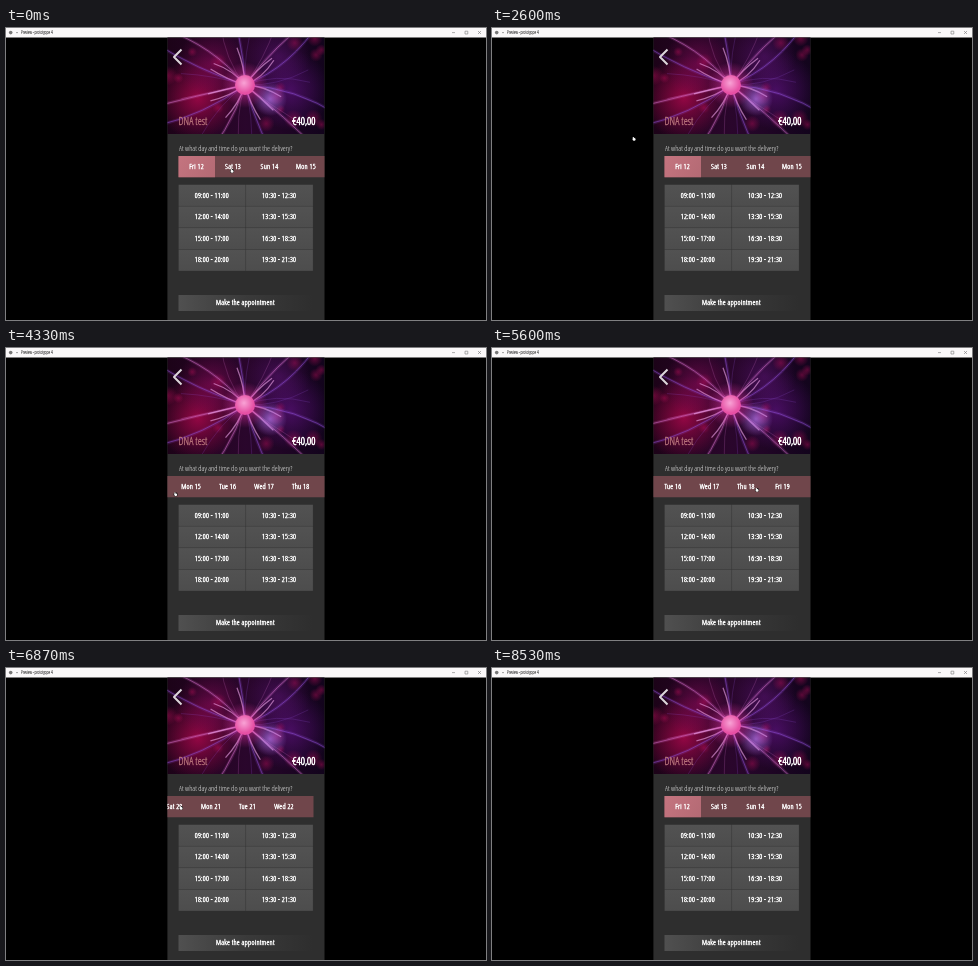
An HTML page with a canvas that plays this animation: 480 px wide and 292 px high, repeating every 9870 ms.

```html
<!DOCTYPE html>
<html lang="en">
<head>
<meta charset="utf-8">
<title>Appointment picker</title>
<style>
html, body { margin: 0; width: 100%; height: 100%; overflow: hidden; background: #000; }
canvas { display: block; width: 480px; height: 292px; }
</style>
</head>
<body>
<canvas id="stage"></canvas>
<script>
const W = 480, H = 292, LOOP = 9870, STEP = 1000 / 15;
const canvas = document.getElementById('stage');
const ctx = canvas.getContext('2d');
const dpr = window.devicePixelRatio || 1;
canvas.width = W * dpr;
canvas.height = H * dpr;

const FONT = '"Open Sans", "Noto Sans", sans-serif';
const DAYS = 'Fri 12,Sat 13,Sun 14,Mon 15,Tue 16,Wed 17,Thu 18,Fri 19,Sat 20,Mon 21,Tue 21,Wed 22'.split(',');
const PHONE = { x: 161.4, y: 9.5, w: 157.1 };
const LEFT = 172.5, CELL_W = 67.3, ROW_H = 21.6;
const CORE = { x: 239, y: 57 };

// Eased progress from 0 to 1 between two times
function glide(t, from, to) {
  const u = Math.min(1, Math.max(0, (t - from) / (to - from)));
  return u * u * (3 - 2 * u);
}

// Eased swing from 0 to 1 and back
const swing = (t, from, to) => Math.sin(Math.PI * glide(t, from, to));

function pose(t) {
  const hover = glide(t, 70, 730);
  const aside = glide(t, 1205, 1265);
  const rest = glide(t, 2470, 2730);
  const back = glide(t, 3070, 3665);
  const drag1 = glide(t, 3900, 4565);
  const again = glide(t, 4670, 5595);
  const drag2 = glide(t, 5670, 6260);
  const follow = glide(t, 6300, 6670);
  const rewind = glide(t, 7200, 7900);
  const lift = glide(t, 7850, 8130);
  const leave = glide(t, 8200, 8530);
  return {
    scroll: 155.5 * glide(t, 3893, 4555) + 158.5 * drag2 - 314 * glide(t, 7150, 8000),
    x: 226 + 60 * hover + 30 * swing(t, 70, 730) - 136 * aside - 16 * rest + 161 * back
      - 174 * drag1 + 144 * again + 25 * swing(t, 4670, 5595) - 155 * drag2
      + 65 * follow + 230 * rewind + 44 * leave,
    y: 143 - 32 * aside + 34 * back + 22 * swing(t, 3070, 3665) + 2 * drag1 - 5 * again
      - 2 * follow - 56 * lift + 146 * leave,
    shown: t < 8500
  };
}

function seeded(seed) {
  return () => {
    seed = (seed * 16807) % 2147483647;
    return seed / 2147483647;
  };
}

function rect(x, y, w, h, fill) {
  ctx.fillStyle = fill;
  ctx.fillRect(x, y, w, h);
}

function disc(x, y, r, fill) {
  ctx.fillStyle = fill;
  ctx.beginPath();
  ctx.arc(x, y, r, 0, 7);
  ctx.fill();
}

function ramp(x0, y0, x1, y1, ...colors) {
  const g = ctx.createLinearGradient(x0, y0, x1, y1);
  colors.forEach((c, i) => g.addColorStop(i / (colors.length - 1), c));
  return g;
}

function glow(x, y, r, rgb, alpha) {
  const g = ctx.createRadialGradient(x, y, 0, x, y, r);
  g.addColorStop(0, `rgba(${rgb},${alpha})`);
  g.addColorStop(1, `rgba(${rgb},0)`);
  rect(x - r, y - r, 2 * r, 2 * r, g);
}

function line(points, color, width) {
  ctx.beginPath();
  points.forEach(([x, y]) => ctx.lineTo(x, y));
  ctx.strokeStyle = color;
  ctx.lineWidth = width;
  ctx.stroke();
}

// Condensed light text; an outline in the same colour adds weight
function text(str, x, y, size, { color = '#fff', align = 'left', weight = 0, spacing = 0 } = {}) {
  ctx.font = `300 condensed ${size}px ${FONT}`;
  ctx.letterSpacing = spacing + 'px';
  ctx.textAlign = align;
  ctx.fillStyle = ctx.strokeStyle = color;
  ctx.lineJoin = 'round';
  ctx.lineWidth = weight;
  if (weight) ctx.strokeText(str, x, y);
  ctx.fillText(str, x, y);
}

const label = (str, x, y) =>
  text(str, x, y, 7.3, { align: 'center', weight: 0.45, spacing: 0.25 });

function clip(x, y, w, h, draw) {
  ctx.save();
  ctx.beginPath();
  ctx.rect(x, y, w, h);
  ctx.clip();
  draw();
  ctx.restore();
}

function titleBar() {
  rect(0, 0, W, 9.5, '#faf8f9');
  disc(4.7, 4.6, 1.8, '#777');
  rect(10, 4.3, 2, 0.8, '#888');
  text('Preview - prototyppe 4', 15, 6.2, 4.4, { color: '#333', weight: 0.1 });
  line([[446, 4.6], [449, 4.6]], '#777', 0.6);
  ctx.strokeRect(459, 3.2, 2.8, 2.8);
  line([[472, 3], [475, 6]], '#777', 0.6);
  line([[475, 3], [472, 6]], '#777', 0.6);
}

function arm(angle, bend, length, width, color) {
  const at = (a, r) => [CORE.x + r * Math.cos(a), CORE.y + r * Math.sin(a)];
  ctx.beginPath();
  ctx.moveTo(CORE.x, CORE.y);
  ctx.quadraticCurveTo(...at(angle, length * 0.5), ...at(angle + bend, length));
  ctx.strokeStyle = color;
  ctx.lineWidth = width;
  ctx.stroke();
}

function photo() {
  const { x, y, w } = PHONE;
  const rnd = seeded(41);
  rect(x, y, w, 97, ramp(x, 0, x + w, 0, '#1c0318', '#2a062c', '#12041c'));
  glow(192, 70, 42, '185,8,80', 0.75);
  glow(205, 36, 34, '130,10,85', 0.65);
  glow(284, 62, 40, '95,18,130', 0.65);
  glow(272, 28, 32, '90,20,115', 0.55);
  for (let i = 0; i < 16; i++) {
    glow(x + rnd() * w, y + rnd() * 97, 4 + rnd() * 6, '200,15,95', 0.4);
  }
  const count = 11;
  for (let i = 0; i < count; i++) {
    const angle = (i + 0.4 * rnd()) * 2 * Math.PI / count;
    const bend = (rnd() - 0.5) * 0.7;
    const tint = i % 2 ? '225,120,215' : '150,85,225';
    arm(angle, bend, 100, 3, `rgba(${tint},.16)`);
    arm(angle, bend, 100, 0.8, `rgba(${tint},.6)`);
    arm(angle, bend, 38, 1.3, 'rgba(240,165,235,.6)');
    arm(angle, -bend, 65, 0.5, `rgba(${tint},.4)`);
  }
  glow(264, 71, 17, '185,120,240', 0.7);
  glow(CORE.x, CORE.y, 23, '235,50,165', 0.75);
  disc(CORE.x, CORE.y, 10, '#e650a4');
  glow(CORE.x - 1, CORE.y - 2, 10, '255,190,230', 0.75);
}

function hero() {
  photo();
  line([[175.5, 21.5], [168, 29], [175.5, 36.5]], '#dcd6da', 2);
  text('DNA test', LEFT, 97.3, 10.5, { color: '#b9757c', weight: 0.3 });
  text('€40,00', 309.5, 97.3, 10.5, { align: 'right', weight: 0.6 });
}

function dayStrip(scroll) {
  clip(PHONE.x, 128, PHONE.w, 21.5, () => {
    const left = LEFT - scroll;
    rect(left, 128, 449, 21.5, '#70464b');
    rect(left, 128, 36.5, 21.5, ramp(left, 128, left + 36.5, 149, '#c4747f', '#b46a74'));
    DAYS.forEach((day, i) => label(day, left + 18 + 36.5 * i, 141));
  });
}

function clock(minutes) {
  const pad = n => String(n).padStart(2, '0');
  return pad(Math.floor(minutes / 60)) + ':' + pad(minutes % 60);
}

// Two-hour slots, starting every 90 minutes from nine
function slotGrid() {
  for (let i = 0; i < 8; i++) {
    const x = LEFT + (i % 2) * CELL_W, y = 156.6 + Math.floor(i / 2) * ROW_H;
    const start = 540 + 90 * i;
    rect(x, y, CELL_W, ROW_H, '#3c3c3c');
    rect(x + 0.3, y + 0.3, CELL_W - 0.6, ROW_H - 0.6, ramp(x, y, x, y + ROW_H, '#525252', '#4d4d4d'));
    label(`${clock(start)} - ${clock(start + 120)}`, x + CELL_W / 2 - 0.3, y + 13);
  }
}

function pointer(x, y) {
  disc(x, y, 2.1, '#151515');
  rect(x - 1.2, y - 2, 1, 2.4, '#fff');
  disc(x + 0.1, y + 0.4, 1.4, '#fff');
}

function draw(t) {
  const { scroll, x, y, shown } = pose(t);
  ctx.setTransform(dpr, 0, 0, dpr, 0, 0);
  rect(0, 0, W, H, '#000');
  titleBar();
  rect(PHONE.x, PHONE.y, PHONE.w, H, '#2e2e2e');
  clip(PHONE.x, PHONE.y, PHONE.w, 96.5, hero);
  text('At what day and time do you want the delivery?', 173, 123.2, 7.5, { color: '#eee' });
  dayStrip(scroll);
  slotGrid();
  rect(LEFT, 267, 134.5, 16, ramp(LEFT, 0, 307, 0, '#505050', '#3a3a3a', '#2e2e2e'));
  label('Make the appointment', 239.4, 277.2);
  if (shown) pointer(x, y);
}

function tick(now) {
  const t = now % LOOP;
  draw(Math.floor((t + 5) / STEP) * STEP);
  requestAnimationFrame(tick);
}
requestAnimationFrame(tick);
</script>
</body>
</html>
```
